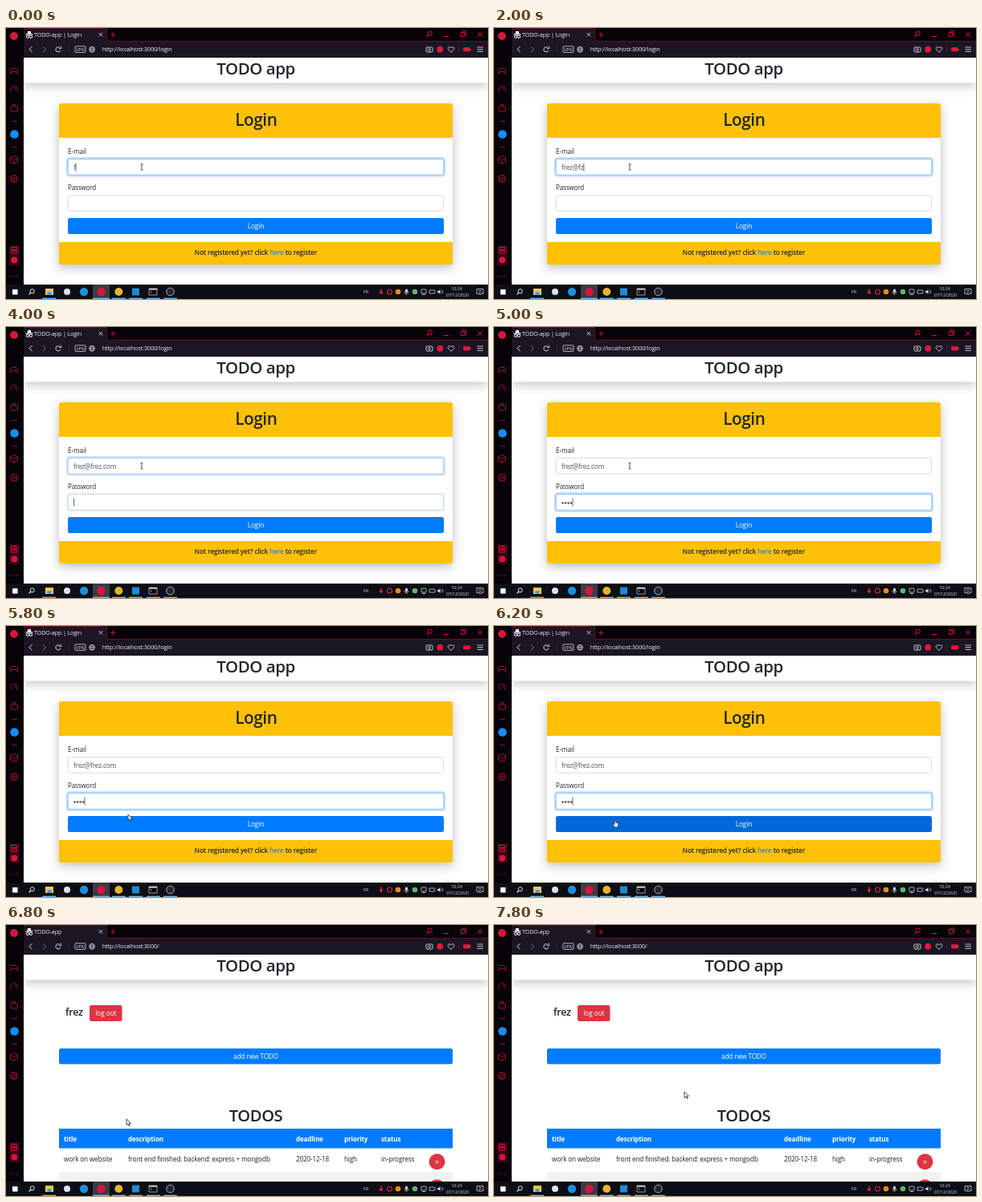
These frames come from a looping animation (600 px wide and 338 px high, 8 s). An HTML page with a canvas:

```html
<!DOCTYPE html>
<html lang="en">
<head>
<meta charset="utf-8">
<title>TODO-app</title>
<style>
html, body { margin: 0; width: 100%; height: 100%; overflow: hidden; background: #fff; }
canvas { display: block; width: 600px; height: 338px; }
</style>
</head>
<body>
<canvas id="stage" width="600" height="338"></canvas>
<script>
const ctx = document.getElementById("stage").getContext("2d");
const LOOP = 8000, STEP = 200;
const RED = "#d5163c", BLUE = "#007bff", YELLOW = "#ffc107", INK = "#212529", PALE = "#d9d6de";
const USER = "frez", EMAIL = USER + "@frez.com", TYPO = USER + "@fz";
// visible characters of the address at each typing step
const TYPED = [1, 2, 3, 4, 4, 5, 5, 6, 7, 7, 7, 6, 6, 5, 6, 7, 8, 9, 10, 13];

function rect(x, y, w, h, color) {
  ctx.fillStyle = color;
  ctx.fillRect(x, y, w, h);
}

function round(x, y, w, h, r, fill, stroke, lw = 1) {
  ctx.beginPath();
  ctx.roundRect(x, y, w, h, r);
  if (fill) { ctx.fillStyle = fill; ctx.fill(); }
  if (stroke) { ctx.strokeStyle = stroke; ctx.lineWidth = lw; ctx.stroke(); }
}

function disc(x, y, r, fill, stroke, lw = 1) {
  ctx.beginPath();
  ctx.arc(x, y, r, 0, Math.PI * 2);
  if (fill) { ctx.fillStyle = fill; ctx.fill(); }
  if (stroke) { ctx.strokeStyle = stroke; ctx.lineWidth = lw; ctx.stroke(); }
}

function path(points, color, lw = 1, fill) {
  ctx.beginPath();
  for (let i = 0; i < points.length; i += 2) ctx.lineTo(points[i], points[i + 1]);
  if (fill) { ctx.closePath(); ctx.fillStyle = fill; ctx.fill(); }
  if (color) { ctx.strokeStyle = color; ctx.lineWidth = lw; ctx.stroke(); }
}

function text(str, x, y, size = 8.3, color = INK, weight = 400, align = "left") {
  ctx.font = `${weight} ${size}px "Open Sans", "Noto Sans", sans-serif`;
  ctx.letterSpacing = -0.02 * size + "px";
  ctx.textAlign = align;
  ctx.fillStyle = color;
  ctx.fillText(str, x, y);
  return ctx.measureText(str).width;
}

function shadowed(color, blur, dy, draw) {
  ctx.save();
  ctx.shadowColor = color;
  ctx.shadowBlur = blur;
  ctx.shadowOffsetY = dy;
  draw();
  ctx.restore();
}

function cross(x, y, r, color, lw) {
  path([x - r, y - r, x + r, y + r], color, lw);
  path([x - r, y + r, x + r, y - r], color, lw);
}

function lens(x, y, color) {
  disc(x + 0.7, y - 0.7, 2.6, null, color, 1);
  path([x - 1.2, y + 1.2, x - 3.5, y + 3.5], color, 1.1);
}

function heart(x, y, color) {
  ctx.beginPath();
  ctx.moveTo(x, y + 3.4);
  ctx.bezierCurveTo(x - 7, y - 1.2, x - 2.6, y - 5.4, x, y - 1.8);
  ctx.bezierCurveTo(x + 2.6, y - 5.4, x + 7, y - 1.2, x, y + 3.4);
  ctx.strokeStyle = color;
  ctx.lineWidth = 0.9;
  ctx.stroke();
}

function sidebar() {
  rect(0, 0, 22, 320, "#050208");
  disc(10, 10, 5, RED);
  const c = "#a3122f";
  path([6, 57, 5, 53, 7, 50.5, 13, 50.5, 15, 53, 14, 57, 12, 54.5, 8, 54.5, 6, 57], c, 1);
  ctx.beginPath();
  ctx.arc(10, 77, 4.3, 2.4, 7);
  ctx.stroke();
  path([10, 77, 12.5, 74.5], c, 1);
  round(6, 98, 8.5, 6, 1, null, c);
  path([8, 98, 8, 95.5, 12, 95.5, 12, 98], c, 1);
  path([7, 116.5, 14, 116.5], c, 0.8);
  disc(10.5, 132.5, 5.3, "#168cf5");
  path([7, 148.5, 14, 148.5], c, 0.8);
  path([10, 159.5, 14.5, 162, 14.5, 167, 10, 169.5, 5.5, 167, 5.5, 162, 10, 159.5], c, 1);
  path([5.5, 162, 10, 164.5, 14.5, 162], c, 0.8);
  path([10, 164.5, 10, 169.5], c, 0.8);
  disc(10, 188, 1.5, null, c);
  disc(10, 188, 4, null, c, 1.2);
  for (let i = 0; i < 8; i++) {
    const a = i * Math.PI / 4;
    path([10 + 4 * Math.cos(a), 188 + 4 * Math.sin(a), 10 + 5.2 * Math.cos(a), 188 + 5.2 * Math.sin(a)], c, 1.2);
  }
  rect(4, 271, 13, 25, "#3a0715");
  round(6.5, 273.5, 7.5, 3, 0.5, null, RED, 1);
  round(6.5, 278, 7.5, 3, 0.5, null, RED, 1);
  disc(10.3, 289.5, 4, RED);
  for (const x of [7, 10.5, 14]) disc(x, 310, 0.7, RED);
}

function browser(title, url, loading) {
  rect(22, 0, 578, 17, "#050208");
  rect(22, 0, 104, 17, "#1b1623");
  rect(22, 16, 578, 21, "#1b1623");
  path([22, 0.5, 125.5, 0.5, 125.5, 16.5, 600, 16.5], "#7d0f29", 0.8);

  if (loading) {
    ctx.beginPath();
    ctx.arc(29, 8.5, 3.2, 3.4, 7.2);
    ctx.strokeStyle = "#8b8892";
    ctx.lineWidth = 1;
    ctx.stroke();
  } else {
    path([26.5, 7.5, 27.3, 4, 30.7, 4, 31.5, 7.5], null, 1, "#fff");
    rect(24.5, 7.4, 9, 1.1, "#fff");
    disc(27, 10.8, 1.7, null, "#fff", 1);
    disc(31, 10.8, 1.7, null, "#fff", 1);
  }
  text(title, 35, 11, 7.2, "#f1eff4");
  cross(118, 8.3, 2.2, PALE, 0.9);
  path([130, 8.3, 136.5, 8.3], RED, 0.9);
  path([133.3, 5, 133.3, 11.6], RED, 0.9);

  lens(527, 7.5, RED);
  path([545, 10.5, 551, 10.5], RED, 1);
  round(566.5, 5.5, 5, 5, 0, null, RED, 0.9);
  path([568, 5.5, 568, 4, 573, 4, 573, 9, 571.5, 9], RED, 0.8);
  cross(590, 8, 2.8, RED, 1);

  const nav = loading ? "#77737e" : PALE;
  path([32.5, 23.2, 29, 26.7, 32.5, 30.2], nav, 1);
  path([46, 23.2, 49.5, 26.7, 46, 30.2], "#77737e", 1);
  if (loading) cross(65, 26.7, 2.5, PALE, 1);
  else {
    ctx.beginPath();
    ctx.arc(65, 26.8, 3.1, 0.3, 5.4);
    ctx.strokeStyle = PALE;
    ctx.lineWidth = 1;
    ctx.stroke();
    path([65.7, 25.5, 68.6, 25.5, 68.6, 22.6], PALE, 0.9);
  }
  path([78.5, 22, 78.5, 31], "#3a3444", 0.7);
  round(86, 22.8, 13, 7.6, 1, null, PALE, 0.8);
  text("VPN", 92.5, 28.6, 5.4, PALE, 400, "center");
  disc(107, 26.7, 3.4, null, PALE, 0.8);
  ctx.beginPath();
  ctx.ellipse(107, 26.7, 1.5, 3.4, 0, 0, 7);
  ctx.stroke();
  path([103.6, 26.7, 110.4, 26.7], PALE, 0.7);
  text(url, 119.7, 29.3, 7.4, "#f1eff4");

  round(523, 24, 8, 6, 1, null, PALE, 0.9);
  disc(527, 27, 1.5, null, PALE, 0.8);
  disc(540.3, 26.7, 3.9, "#e0183f");
  heart(554, 26.8, PALE);
  path([564, 22, 564, 31], "#3a3444", 0.7);
  round(569.5, 24.5, 8, 4.5, 0.5, "#e0183f", "#e0183f", 0.7);
  rect(578.2, 25.8, 1, 2, "#e0183f");
  for (const y of [24, 26.7, 29.4]) path([586.5, y, 594, y], PALE, 0.9);
}

function taskbar() {
  rect(0, 320, 600, 18, "#0d0e16");
  rect(8, 326, 6.5, 6.5, "#fff");
  lens(32, 329, "#e6e6ea");
  rect(108, 320, 21, 18, "#3b3b44");
  rect(49, 325, 10, 8, "#f5c84b");
  rect(51.5, 329, 5, 4, "#3f9fe0");
  disc(76, 329, 4, "#d9e3ec");
  disc(97, 329, 5.2, "#1c8fd6");
  disc(118.5, 329, 5.2, RED);
  disc(140.3, 329, 5, "#e4b52b");
  rect(157, 324.5, 9, 9, "#1f8ad6");
  rect(178, 325, 10, 8, "#08080a");
  round(178, 325, 10, 8, 0, null, "#b9bcc2", 0.8);
  rect(178, 325, 10, 1.7, "#c9ccd1");
  path([179.8, 328, 181.3, 329.3, 179.8, 330.6], "#fff", 0.6);
  disc(204.5, 329, 4.8, "#24252d", "#b9bcc2", 0.9);
  for (const x of [45, 132, 153, 175, 196]) rect(x, 336.7, 17, 1.3, "#76b9ed");
  rect(108, 336.7, 21, 1.3, "#76b9ed");

  const c = "#d5d6dc";
  text("FR", 445, 331, 5.6, c);
  path([467, 325.5, 467, 331], "#dd2940", 1.6);
  path([464.3, 329, 469.7, 329, 467, 332.5], null, 1, "#dd2940");
  disc(477.5, 329, 3, null, "#c52d3e", 1.1);
  disc(488, 329, 3.3, "#f08a22");
  round(497, 325.5, 3, 4.5, 1.5, c);
  path([496, 329, 496.8, 331, 500.2, 331, 501, 329], c, 0.7);
  path([498.5, 331, 498.5, 333], c, 0.7);
  disc(509, 329, 3.3, "#56b870");
  round(517, 326, 6, 5, 0.5, null, c, 0.8);
  path([518, 332.5, 522, 332.5], c, 0.8);
  round(527, 327, 7, 4, 0.5, null, c, 0.8);
  path([537, 328, 538.5, 328, 540.5, 326, 540.5, 332, 538.5, 330, 537, 330], null, 1, c);
  for (const r of [1.8, 3.4]) {
    ctx.beginPath();
    ctx.arc(540.6, 329, r, -0.8, 0.8);
    ctx.strokeStyle = c;
    ctx.lineWidth = 0.6;
    ctx.stroke();
  }
  text("10:24", 561, 326.7, 5.5, c, 400, "center");
  text("07/12/2020", 562, 335, 5.5, c, 400, "center");
  path([586, 325.5, 594, 325.5, 594, 331.5, 591.5, 331.5, 590, 333, 590, 331.5, 586, 331.5, 586, 325.5], c, 0.8);
  path([588, 327.5, 592, 327.5], c, 0.6);
  path([588, 329.5, 592, 329.5], c, 0.6);
}

function pageHeader() {
  rect(22, 37, 578, 283, "#fefefe");
  shadowed("rgba(0,0,0,.22)", 13, 4, () => rect(22, 37, 578, 31.5, "#fff"));
  text("TODO app", 311, 58, 20.4, INK, 600, "center");
}

// focus runs from 0 (blurred) to 1 (full ring)
function field(y, focus) {
  if (focus) round(76.3, y - 0.9, 469.4, 21.8, 3, null, `rgba(0,123,255,${0.27 * focus})`, 2.6);
  round(77.3, y + 0.3, 467.4, 19.6, 2.2, "#fff", focus ? `rgb(${206 - 78 * focus},${212 - 23 * focus},${218 + 37 * focus})` : "#ced4da", 0.8);
}

function caret(x, y) {
  rect(x, y - 5, 0.8, 10, "#3d4248");
}

function loginPage(step) {
  pageHeader();
  shadowed("rgba(0,0,0,.25)", 13, 4, () => round(66, 94, 490, 201, 2.5, "#fff"));
  round(66, 94, 490, 43, [2.5, 2.5, 0, 0], YELLOW);
  round(66, 267, 490, 28, [0, 0, 2.5, 2.5], YELLOW);
  text("Login", 311.3, 121.7, 20.7, INK, 600, "center");

  const emailFocus = step < 20 ? 1 : step === 20 ? 0.75 : 0;
  const passFocus = step < 20 ? 0 : step === 20 ? 0.25 : step < 32 ? 1 : 0;
  text("E-mail", 77, 157, 8.3);
  field(163.3, emailFocus);
  const typo = step >= 8 && step <= 10;
  const shown = typo ? TYPO : EMAIL.slice(0, TYPED[step] ?? EMAIL.length);
  const w = text(shown, 84, 176.8, 8.3, "#495057");
  if (step < 20) caret(84 + w, 173.7);

  text("Password", 77, 201.8, 8.1);
  field(208.5, passFocus);
  const dots = Math.max(0, Math.min(4, step - 21));
  for (let i = 0; i < dots; i++) disc(85.6 + i * 3.5, 219.4, 1.25, "#495057");
  if (passFocus) caret(84 + dots * 3.4, 218.5);

  if (step >= 32) round(76, 236, 470, 22, 3.2, null, "rgba(38,143,255,.55)", 2.4);
  round(77, 237, 468, 20, 2.5, step >= 30 ? "#0069d9" : BLUE);
  text("Login", 311, 250.3, 8.4, "#fff", 400, "center");

  let x = 234.6;
  for (const [part, color] of [["Not registered yet? click ", INK], ["here", "#2f86e0"], [" to register", INK]])
    x += text(part, x, 283, 8.3, color, 600);
}

function listPage() {
  pageHeader();
  text(USER, 74, 113.3, 12.6, INK, 600);
  round(104, 100, 40.5, 20, 2.5, "#dc3545");
  text("log out", 124.3, 113.3, 8.4, "#fff", 400, "center");
  round(66, 154, 490, 19.6, 2.5, BLUE);
  text("add new TODO", 311, 167, 8.2, "#fff", 400, "center");
  text("TODOS", 311, 245, 20.1, INK, 600, "center");

  rect(66, 254, 490, 24.5, BLUE);
  rect(66, 309, 490, 11, "#f2f2f2");
  rect(66, 308.6, 490, 0.6, "#dee2e6");
  const columns = [
    [72, "title", "work on website"],
    [152, "description", "front end finished. backend: express + mongodb"],
    [361, "deadline", "2020-12-18"],
    [421, "priority", "high"],
    [467, "status", "in-progress"]
  ];
  for (const [x, head, cell] of columns) {
    text(head, x, 269.5, 8.1, "#fff", 700);
    text(cell, x, 295, 8.2);
  }
  for (const y of [295.3, 327.3]) {
    disc(536.5, y, 10, "#dc3545");
    cross(536.5, y + 0.3, 1.7, "#fff", 0.9);
  }
}

function beam(x, y) {
  path([x, y - 3.5, x, y + 3.5], "#222", 0.8);
  path([x - 1.6, y - 3.6, x + 1.6, y - 3.6], "#222", 0.7);
  path([x - 1.6, y + 3.6, x + 1.6, y + 3.6], "#222", 0.7);
}

function arrow(x, y) {
  path([x, y, x, y + 7.6, x + 1.8, y + 6, x + 3, y + 8.6, x + 4.2, y + 8, x + 3, y + 5.5, x + 5.3, y + 5.3, x, y], "#222", 0.8, "#fff");
}

function hand(x, y) {
  path([x, y, x + 1.2, y, x + 1.4, y + 3, x + 4.6, y + 3.8, x + 4.6, y + 6.5, x + 3.6, y + 9,
    x + 0.2, y + 9, x - 2, y + 5.5, x - 1.4, y + 4.6, x, y + 5.8, x, y], "#222", 0.7, "#fff");
}

const glide = (t, from, to) => {
  const k = Math.max(0, Math.min(1, (t - from) / (to - from)));
  return k * k * (3 - 2 * k);
};

function pointer(t) {
  if (t >= 6800) {
    const k = glide(t, 7200, 7800);
    return arrow(150 + 87 * k, 242 - 34 * k);
  }
  const k = glide(t, 5000, 6000);
  const x = 169 - 19 * k, y = 173.3 + 68.7 * k;
  if (y >= 237) hand(x, y);
  else if (y < 184 || (y > 208 && y < 229)) beam(x, y);
  else arrow(x, y);
}

function draw(now) {
  const step = Math.floor((now % LOOP) / STEP), t = step * STEP;
  const loaded = t >= 6800;
  if (loaded) listPage();
  else loginPage(step);
  pointer(t);
  browser(loaded ? "TODO-app" : "TODO-app | Login", "http://localhost:3000/" + (loaded ? "" : "login"), step === 33);
  sidebar();
  taskbar();
}

let start;
function tick(now) {
  start ??= now;
  draw(now - start);
  requestAnimationFrame(tick);
}
requestAnimationFrame(tick);
</script>
</body>
</html>
```
